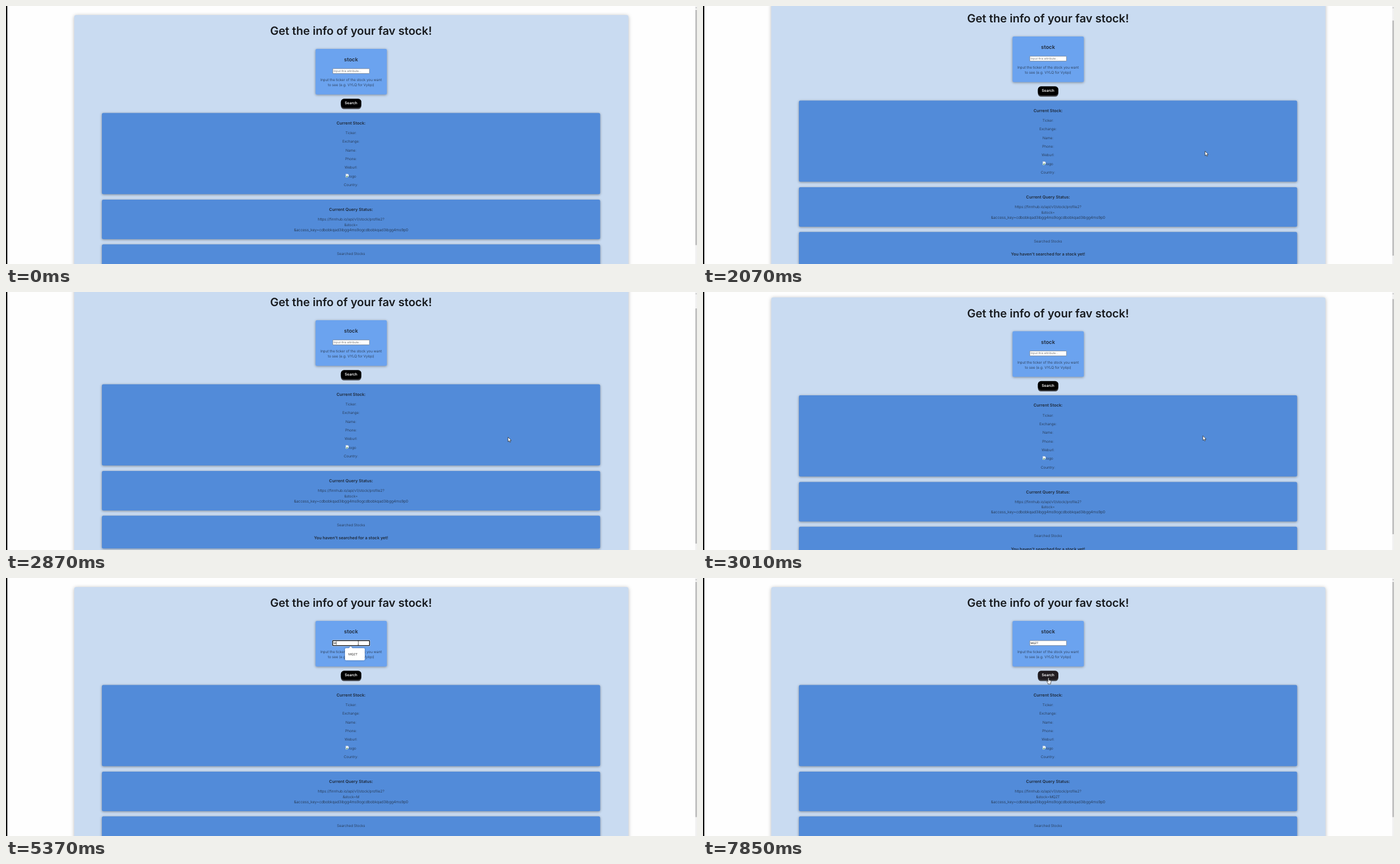
An HTML page that plays this animation: 1225 px wide and 457 px high, repeating every 8000 ms.

```html
<!DOCTYPE html>
<html lang="en">
<head>
<meta charset="utf-8">
<title>Stock info</title>
<style>
  html, body { margin: 0; width: 100%; height: 100%; overflow: hidden; background: #fefefe; }
  svg { display: block; width: 1225px; height: 457px; }
  text { font: 300 6.35px Inter, "Open Sans", sans-serif; fill: #202c3d; text-rendering: geometricPrecision; }
  .mid text { text-anchor: middle; }
  .mid .head { font-size: 7.35px; font-weight: 600; fill: #1f2a3a; }
  .mid .title { font-size: 20.1px; font-weight: 600; fill: #181b1f; }
  .mid .name { font-size: 9.3px; font-weight: 600; }
  .mid .go { font-size: 6.55px; font-weight: 600; fill: #fff; }
  .field { font-size: 5.2px; font-weight: 400; }
  .typed { font-size: 4.7px; font-weight: 400; fill: #111; }
  .item { font-size: 5.5px; font-weight: 400; fill: #333; }
  .card { fill: #528bd9; filter: drop-shadow(0 1.5px 2px rgba(0, 0, 0, .38)); }
  .panel { fill: #c9dbf1; filter: drop-shadow(0 1px 3px rgba(0, 0, 0, .28)); }
  .list { filter: drop-shadow(0 .8px 1.5px rgba(0, 0, 0, .35)); }
</style>
</head>
<body>
<svg viewBox="0 0 1225 457">
  <g id="page">
    <rect class="panel" x="121" y="16" width="982.5" height="500" rx="3.5"/>
    <rect class="card" x="548.7" y="76" width="126.5" height="80.7" rx="2.5" style="fill:#6ba3ef"/>
    <rect class="card" x="170" y="189.5" width="883.3" height="143.8" rx="2.5"/>
    <rect class="card" x="170" y="343" width="883.3" height="70" rx="2.5"/>
    <rect class="card" x="170" y="422.3" width="883.3" height="58" rx="2.5"/>

    <rect x="593.7" y="165" width="36.2" height="17.6" rx="5.5" fill="#3b3d42"/>
    <rect id="button" x="593.7" y="164.3" width="36.2" height="15.9" rx="5.5"/>

    <g class="mid" id="labels">
      <text class="title" x="611.7" y="51">Get the info of your fav stock!</text>
      <text class="name" x="611.7" y="98.2">stock</text>
      <text x="611.7" y="133.3">Input the ticker of the stock you want</text>
      <text x="611.7" y="142.4">to see (e.g. VYLQ for Vylqo)</text>
      <text class="go" x="611.7" y="174.4">Search</text>
      <text class="head" x="611.7" y="209.9">Current Stock:</text>
      <text class="head" x="611.7" y="363.1">Current Query Status:</text>
      <text x="611.7" y="380.1" style="font-size:6.5px">https://finnhub.io/api/v1/stock/profile2?</text>
      <text id="query" x="611.7" y="389.5"></text>
      <text x="611.7" y="398.7" style="font-size:6.75px">&amp;access_key=cdbobkqad3ibgg4ms9ogcdbobkqad3ibgg4ms9p0</text>
      <text x="611.7" y="440.8">Searched Stocks</text>
      <text class="head" x="611.7" y="464.4">You haven't searched for a stock yet!</text>
    </g>

    <g transform="translate(602 297.2)">
      <path d="M.3 .3H4L5.8 2V6.3H.3Z" fill="#eef3fb" stroke="#a9b4c4" stroke-width=".5"/>
      <path d="M.7 5.8 3 3.4 4 4.4 2.6 5.8Z" fill="#4c9a4a"/>
      <path d="M2.8 6.8 6.2 3.4V6.8Z" fill="#528bd9"/>
    </g>
    <text x="608" y="303.8">logo</text>

    <rect x="579.3" y="111" width="65" height="8.6" rx=".6" fill="#fff" stroke="#6c7480" stroke-width=".7"/>
    <g id="ring" fill="none">
      <rect x="578.3" y="110" width="67" height="10.6" rx="1.4" stroke="#fff" stroke-width=".6"/>
      <rect x="579.1" y="110.9" width="65.4" height="8.8" rx=".8" stroke="#101010" stroke-width="1.3"/>
    </g>
    <text class="field" id="hint" x="580.8" y="116.9" style="fill:#757575">Input this attribute...</text>
    <text class="typed" id="typed" x="580.8" y="116.8"></text>
    <rect id="caret" y="112.3" width=".6" height="6" fill="#111"/>
  </g>

  <g id="list" class="list">
    <path d="M607.3 124.8 611 121 614.7 124.8Z" fill="#fff"/>
    <rect id="sheet" x="601" y="124.3" width="35" height="38.7" rx="1.8" fill="#fff"/>
    <text class="item" x="607" y="137.1">MQZT</text>
    <text class="item" id="second" x="607" y="154.4">C</text>
  </g>

  <rect width="2.3" height="457" fill="#000"/>
  <rect x="1221.8" width="3.2" height="457" fill="#f1f1f1"/>
  <path d="M1222.4 3.6 1223.5 2.2 1224.6 3.6Z" fill="#777"/>
  <rect id="thumb" x="1222" y="7" width="3" height="416.5" fill="#c1c1c1"/>

  <circle id="click" fill="#f5e50c" fill-opacity=".8"/>
  <g id="pointer">
    <path id="arrow" d="M0 0V8.2L1.9 6.5 3.2 9.3 4.5 8.7 3.3 6H5.8Z" fill="#fff" stroke="#1c1c1c" stroke-width=".7"/>
    <path id="beam" d="M-1.2-4H-.3L0-3.7 .3-4H1.2M0-3.7V3.7M-1.2 4H-.3L0 3.7 .3 4H1.2" fill="none" stroke="#222" stroke-width=".7"/>
    <path id="hand" d="M-.8 .6C-.8-.4 .8-.4 .8 .6V4L3.7 4.6Q4.7 5 4.6 6.2L3.8 9.2V10.8H-.9V9.4L-3.3 6.4C-3.4 5.3-2.2 5.2-.8 6.8Z" fill="#fff" stroke="#1c1c1c" stroke-width=".7"/>
  </g>
</svg>
<script>
const LOOP = 8000;
const el = {};
document.querySelectorAll('[id]').forEach(n => el[n.id] = n);
const show = (node, on) => node.setAttribute('visibility', on ? 'visible' : 'hidden');
const set = (node, attrs) => { for (const k in attrs) node.setAttribute(k, attrs[k]); };
const clamp = v => Math.max(0, Math.min(1, v));
const easeOut = p => 1 - (1 - p) ** 2;
const smooth = p => p * p * (3 - 2 * p);

['Ticker:', 'Exchange:', 'Name:', 'Phone:', 'Weburl:', '', 'Country:'].forEach((label, i) => {
  const t = document.createElementNS('http://www.w3.org/2000/svg', 'text');
  set(t, { x: 611.7, y: 227.1 + i * 15.33 });
  t.textContent = label;
  el.labels.append(t);
});

// Index of the current screen update within a burst of n updates
const tick = (t, from, to, n) => Math.min(n - 1, Math.floor((t - from) / (to - from) * (n - 1) + 1e-6));

// Catmull-Rom curve through the points
function along(pts, p) {
  const s = clamp(p) * (pts.length - 1), i = Math.min(pts.length - 2, Math.floor(s)), u = s - i;
  const at = j => pts[Math.max(0, Math.min(pts.length - 1, j))];
  const [a, b, c, d] = [at(i - 1), at(i), at(i + 1), at(i + 2)];
  return [0, 1].map(k => b[k] + u / 2 * (c[k] - a[k] +
    u * (2 * a[k] - 5 * b[k] + 4 * c[k] - d[k] + u * (3 * (b[k] - c[k]) + d[k] - a[k]))));
}

const moves = [
  { from: 190, to: 670, n: 8, first: 0, ease: easeOut, pts: [[1182, 433], [1030, 335], [890, 259]] },
  { from: 1270, to: 1340, n: 2, first: 1, ease: p => p, pts: [[890, 259], [890, 257]] },
  { from: 2870, to: 3630, n: 12, first: 0, ease: p => smooth(clamp((p - .1) / .9)), pts: [[890, 257], [740, 165], [608.5, 116]] },
  { from: 4030, to: 4440, n: 6, first: 1, ease: smooth, pts: [[608.5, 116], [615, 115.5]] },
  { from: 4570, to: 4840, n: 4, first: 1, ease: easeOut, pts: [[615, 115.5], [624.5, 115]] },
  { from: 6250, to: 7020, n: 12, first: 1, ease: smooth, pts: [[624.5, 115], [720, 130], [826, 112], [790, 78], [729, 76]] },
  { from: 7090, to: 7540, n: 7, first: 1, ease: easeOut, pts: [[729, 76], [690, 36], [640, 70], [618, 140], [612.5, 177]] }
];

function pointerAt(t) {
  const m = moves.filter(m => t >= m.from).pop();
  if (!m) return null;
  const p = (tick(t, m.from, m.to, m.n) + m.first) / (m.n - 1 + m.first);
  return along(m.pts, m.ease(p));
}

function scrollAt(t) {
  if (t < 2000) return 0;
  if (t < 2870) return [12, 22, 25, 26][tick(t, 2000, 2210, 4)];
  return 26 * (1 - easeOut(clamp(tick(t, 2870, 3630, 12) / 4)));
}

const keys = [5370, 5450, 5650, 5815];
const inside = (p, x, y, w, h) => p && p[0] > x && p[0] < x + w && p[1] > y && p[1] < y + h;

function draw(t) {
  const y = scrollAt(t), p = pointerAt(t);
  set(el.page, { transform: `translate(0 ${-y})` });
  set(el.thumb, { y: 7 + y * .85 });

  const word = 'MQZT'.slice(0, keys.filter(k => t >= k).length);
  el.typed.textContent = word;
  el.query.textContent = '&stock=' + word;
  show(el.hint, !word);

  const focus = t >= 3760 && t < 7620;
  show(el.ring, focus);
  show(el.caret, focus && word);
  set(el.caret, { x: 580.9 + [0, 4.3, 8, 11, 14][word.length] });

  show(el.list, t >= 3760 && t < 5980);
  set(el.list, { opacity: t < 5900 ? 1 : .4 });
  set(el.sheet, { height: word ? 21.5 : 38.7 });
  show(el.second, t >= 3760 && !word);

  const overButton = inside(p, 593, 164, 37, 19), overField = inside(p, 579, 110, 66, 10);
  set(el.button, { fill: overButton ? '#201b20' : '#000' });
  show(el.arrow, p && !overButton && !overField);
  show(el.beam, overField);
  show(el.hand, overButton);
  if (p) set(el.pointer, { transform: `translate(${p[0]} ${p[1]})` });

  const hit = [3760, 7620].find(h => t >= h && t < h + 200);
  show(el.click, hit);
  if (hit) set(el.click, { cx: p[0], cy: p[1] + .4, r: t < hit + 130 ? 4.6 : 2.5 });
}

const start = performance.now();
function frame() {
  draw((performance.now() - start) % LOOP);
  requestAnimationFrame(frame);
}
draw(0);
requestAnimationFrame(frame);
</script>
</body>
</html>
```
